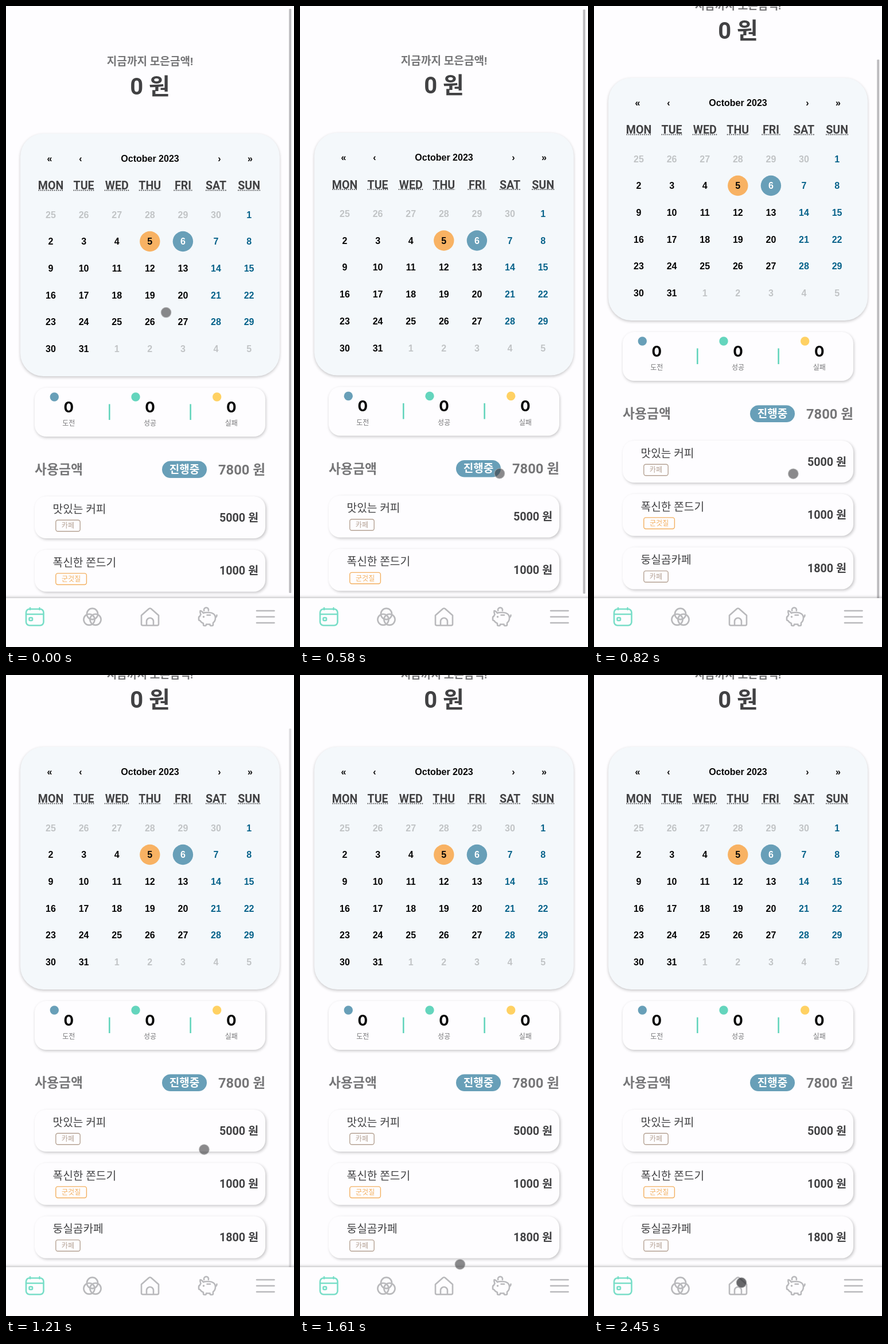
Recreate the animation shown at these times as an HTML page with a canvas. Size 502 by 1115 pixels, loop 3.18 s.

```html
<!DOCTYPE html>
<html lang="ko">
<head>
<meta charset="utf-8">
<title>Savings calendar</title>
<style>
html, body { margin: 0; width: 100%; height: 100%; overflow: hidden; background: #fefdff; }
canvas { display: block; width: 502px; height: 1115px; }
</style>
</head>
<body>
<canvas id="stage"></canvas>
<script>
const W = 502, H = 1115, LOOP = 3180;
const SANS = "Roboto, 'Noto Sans CJK KR', 'Noto Sans KR', 'Noto Sans CJK', sans-serif";
const ARIAL = "'Liberation Sans', Arial, sans-serif";
const PAPER = '#fefdff', BLUE = '#689fb8', GREEN = '#64d5bd', ORANGE = '#f8b263';
const INK = '#414143', MUTED = '#767678', ICON = '#b9b9bc';

const canvas = document.getElementById('stage');
const g = canvas.getContext('2d');
const dpr = window.devicePixelRatio || 1;
canvas.width = W * dpr;
canvas.height = H * dpr;

// [time, offset]: each offset holds until the next
const scrollSteps = [[0, 0], [580, 1.5], [610, 20], [670, 54], [730, 83], [820, 97]];
// [time, x, y]: positions in between are interpolated
const pointerKeys = [
  [0, 279, 533], [60, 281, 538], [130, 290, 564], [220, 313, 640], [310, 337, 727],
  [400, 350, 787], [470, 351, 807], [550, 348, 813], [670, 347.5, 813.5], [1090, 347, 814],
  [1210, 345.5, 825], [1300, 337, 861], [1400, 316, 925], [1500, 296, 985], [1610, 279, 1025],
  [1730, 268, 1044], [1870, 260, 1054], [2030, 257, 1057]
];

function stepAt(steps, t) {
  return steps.filter(s => s[0] <= t).pop()[1];
}

function track(keys, t) {
  const i = keys.findIndex(k => k[0] > t);
  if (i < 0) return keys[keys.length - 1].slice(1);
  const a = keys[i - 1], b = keys[i], p = (t - a[0]) / (b[0] - a[0]);
  return a.slice(1).map((v, n) => v + (b[n + 1] - v) * p);
}

// y is the vertical middle of the capitals
function text(str, x, y, size, color, { weight = 700, align = 'center', font = SANS } = {}) {
  g.font = `${weight} ${size}px ${font}`;
  g.textAlign = align;
  g.fillStyle = color;
  g.fillText(str, x, y + size * 0.36);
}

function box(x, y, w, h, r) {
  g.beginPath();
  g.roundRect(x, y, w, h, r);
}

function panel(x, y, w, h, r, fill, dx) {
  g.save();
  g.shadowColor = 'rgba(0,0,0,0.22)';
  g.shadowBlur = 5 * dpr;
  g.shadowOffsetX = dx * dpr;
  g.shadowOffsetY = 2 * dpr;
  g.fillStyle = fill;
  box(x, y, w, h, r);
  g.fill();
  g.restore();
}

function disc(x, y, r, fill) {
  g.beginPath();
  g.arc(x, y, r, 0, Math.PI * 2);
  g.fillStyle = fill;
  g.fill();
}

function ring(x, y, r) {
  g.beginPath();
  g.arc(x, y, r, 0, Math.PI * 2);
  g.stroke();
}

function line(x1, y1, x2, y2) {
  g.beginPath();
  g.moveTo(x1, y1);
  g.lineTo(x2, y2);
  g.stroke();
}

function drawCalendar() {
  panel(25, 222, 452, 422, 40, '#f4f8fb', 0);
  const arial = { font: ARIAL };
  text('October 2023', 251, 265, 16, '#0a0a0a', arial);
  [['«', 76], ['‹', 130], ['›', 372], ['»', 425.5]].forEach(([s, x]) => text(s, x, 265, 16, '#0a0a0a', arial));

  const colX = c => 78 + c * 57.6;
  const widths = [43, 36, 43, 38, 32, 36, 39];
  ['MON', 'TUE', 'WED', 'THU', 'FRI', 'SAT', 'SUN'].forEach((day, c) => {
    text(day, colX(c), 312, 19.6, INK);
    g.strokeStyle = INK;
    g.lineWidth = 1.6;
    g.setLineDash([1.7, 1.7]);
    line(colX(c) - widths[c] / 2, 320.6, colX(c) + widths[c] / 2, 320.6);
    g.setLineDash([]);
  });

  for (let i = 0; i < 42; i++) {
    const c = i % 7, x = colX(c), y = 362.8 + Math.floor(i / 7) * 46.7;
    const n = i - 5;
    const outside = n < 1 || n > 31;
    const label = n < 1 ? n + 30 : n > 31 ? n - 31 : n;
    let color = outside ? '#c1c4c6' : c > 4 ? '#06628a' : '#050505';
    if (n === 5) disc(x, y, 17.7, ORANGE);
    if (n === 6) {
      disc(x, y, 17.7, BLUE);
      color = '#fff';
    }
    text(label, x, y, 16, color, arial);
  }
}

function drawStats() {
  panel(50, 664, 402, 85, 20, PAPER, 1);
  [['도전', BLUE], ['성공', GREEN], ['실패', '#ffd163']].forEach(([label, color], i) => {
    const x = 109.3 + i * 141.7;
    disc(x - 25, 680, 7.7, color);
    text('0', x, 697.5, 26, '#050505', { font: 'Inter, sans-serif' });
    text(label, x, 726, 12, MUTED, { weight: 400 });
  });
  g.fillStyle = GREEN;
  g.fillRect(179, 692.5, 2.6, 27.5);
  g.fillRect(320.3, 692.5, 2.6, 27.5);
}

function drawItem(i, name, tag, color, tagWidth, price) {
  const y = 853 + i * 92.7;
  panel(50, y, 402, 73, 20, PAPER, 2);
  text(name, 81.5, y + 22, 19.2, INK, { weight: 400, align: 'left' });
  g.strokeStyle = color;
  g.lineWidth = 1.4;
  box(86.8, y + 41.2, tagWidth, 19.6, 3.5);
  g.stroke();
  text(tag, 86.8 + tagWidth / 2, y + 51, 12.1, color, { weight: 400 });
  text(price, 406, y + 36.5, 19.7, INK);
}

function drawPage(scroll) {
  g.save();
  g.translate(0, -scroll);
  text('지금까지 모은금액!', 251, 96.5, 19.1, MUTED);
  text('0 원', 251, 139.5, 40, INK);
  drawCalendar();
  drawStats();
  text('사용금액', 50, 806, 22.8, MUTED, { align: 'left' });
  g.fillStyle = BLUE;
  box(272, 791.5, 78, 29.5, 14.75);
  g.fill();
  text('진행중', 311, 806, 19, '#fff');
  text('7800 원', 411, 806, 23.7, MUTED);
  drawItem(0, '맛있는 커피', '카페', '#b5a294', 42.4, '5000 원');
  drawItem(1, '폭신한 쫀드기', '군것질', '#f3b060', 53.6, '1000 원');
  drawItem(2, '둥실곰카페', '카페', '#b5a294', 42.4, '1800 원');
  g.restore();
}

function drawPig() {
  g.stroke(new Path2D(`M344 1056 C342 1053 340 1052 338.5 1052 Q337.8 1055 339.5 1058.5
    Q338 1060.5 337.5 1062 Q336 1062 336 1064 V1067 Q336 1069 338 1069
    Q340 1072 344 1074 V1076 Q344 1078 346 1078 H347.5 Q349 1078 349 1075.5
    H355.5 Q355.5 1078 357 1078 H359 Q361 1078 361 1076 V1073
    C364 1070.5 365 1067.5 365 1064.5 C365 1058 359.5 1055 354 1055 H349
    Q346 1055 344 1056 M365 1063.5 Q367.5 1062.5 367.5 1059.5 M350.5 1059.5 H356`));
  g.beginPath();
  g.arc(349, 1050.5, 4, Math.PI * 0.9, Math.PI * 2.1);
  g.stroke();
  disc(344.5, 1062.5, 1.7, ICON);
}

function drawNav() {
  g.save();
  g.shadowColor = 'rgba(0,0,0,0.3)';
  g.shadowBlur = 5 * dpr;
  g.shadowOffsetY = -1 * dpr;
  g.fillStyle = PAPER;
  g.fillRect(-10, 1030, W + 20, 100);
  g.restore();

  g.lineWidth = 2.6;
  g.lineCap = g.lineJoin = 'round';
  g.strokeStyle = '#79dec8';
  box(35, 1049, 30.5, 28.5, 6);
  g.stroke();
  line(35, 1058, 65, 1058);
  line(42, 1047, 42, 1050);
  line(58.5, 1047, 58.5, 1050);
  box(40.5, 1064, 5.5, 5, 1.5);
  g.stroke();

  g.strokeStyle = ICON;
  ring(150.5, 1057.5, 9.6);
  ring(145, 1067.3, 9.6);
  ring(156, 1067.3, 9.6);
  g.stroke(new Path2D(`M236 1060 L249 1048.5 Q251 1047 253 1048.5 L266 1060 V1075
    Q266 1077.5 263.5 1077.5 H238.5 Q236 1077.5 236 1075 Z
    M245 1077 V1070.5 A6 6 0 0 1 257 1070.5 V1077`));
  drawPig();
  [1052, 1062.5, 1073].forEach(y => line(437, y, 467.5, y));
  g.lineCap = 'butt';
  g.lineJoin = 'miter';
}

function drawScrollbar(t, scroll) {
  g.globalAlpha = Math.max(0, Math.min(1, (1310 - t) / 200));
  g.fillStyle = '#bcbbbe';
  box(493.3, 5 + scroll * 0.91, 4, 1016, 1);
  g.fill();
  g.globalAlpha = 1;
}

function drawPointer(t) {
  const [x, y] = track(pointerKeys, t);
  const pressed = t >= 2450;
  disc(x, y, 9, pressed ? 'rgba(50,50,54,0.74)' : 'rgba(60,60,62,0.6)');
  g.strokeStyle = 'rgba(190,190,192,0.6)';
  g.lineWidth = 1.3;
  ring(x, y, 8.8);
}

function frame(now) {
  const t = now % LOOP;
  const scroll = stepAt(scrollSteps, t);
  g.setTransform(dpr, 0, 0, dpr, 0, 0);
  g.fillStyle = PAPER;
  g.fillRect(0, 0, W, H);
  drawPage(scroll);
  drawScrollbar(t, scroll);
  drawNav();
  drawPointer(t);
  requestAnimationFrame(frame);
}
frame(0);
</script>
</body>
</html>
```
